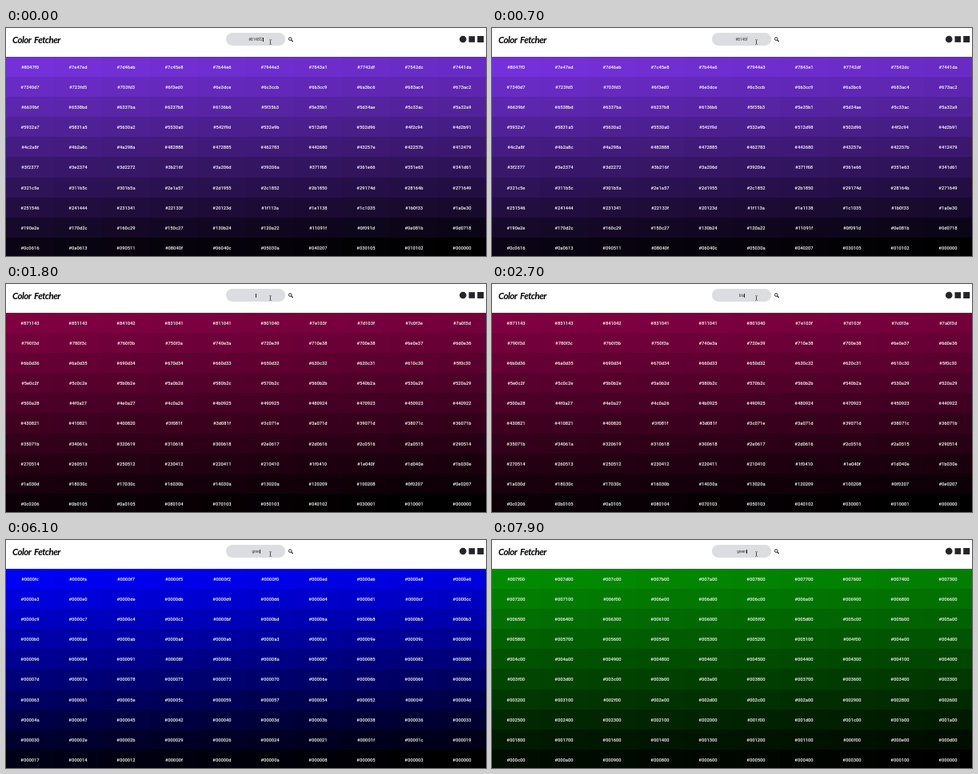
Animation of 600x285 px, one loop 8 s. Source, as an HTML page:

```html
<!DOCTYPE html>
<html lang="en">
<head>
<meta charset="utf-8">
<title>Color Fetcher</title>
<style>
  html, body { margin: 0; width: 100%; height: 100%; overflow: hidden; background: #fff; }
  #stage { position: relative; width: 600px; height: 285px; overflow: hidden; font-family: Roboto, sans-serif; }
  h1 {
    position: absolute; left: 8px; top: 6px; margin: 0; white-space: nowrap; color: #000;
    font: italic 700 11.5px/18px Lato, sans-serif; letter-spacing: -.5px; word-spacing: 2px;
  }
  #field {
    position: absolute; left: 275px; top: 6px; width: 74px; height: 16px; border-radius: 8px;
    background: #dcdde1; color: #333; font-size: 4.7px; line-height: 17px; text-align: center;
  }
  #caret { display: inline-block; width: .6px; height: 5.5px; margin-right: -.6px; background: #222; vertical-align: -1px; }
  svg { position: absolute; left: 0; top: 0; }
  #grid {
    position: absolute; left: 0; top: 36px; width: 600px; height: 251px;
    display: grid; grid-template: repeat(10, 25.1px) / repeat(10, 60px);
  }
  #grid div { color: #fff; font-size: 5.8px; font-weight: 500; line-height: 26.1px; text-align: center; }
</style>
</head>
<body>
<div id="stage">
  <h1>Color Fetcher</h1>
  <div id="field"><span id="query"></span><span id="caret"></span></div>
  <svg width="600" height="36" fill="none" stroke="#222">
    <circle cx="355.2" cy="13.6" r="1.8" stroke-width="1"/>
    <path d="M356.6 15l2 2" stroke-width="1.2"/>
    <path d="M329 14.5q1.5 0 1.5 1v4q0 1-1.5 1M332 14.5q-1.5 0-1.5 1v4q0 1 1.5 1" stroke-width=".5"/>
    <g fill="#24262b" stroke="none">
      <circle cx="571.2" cy="14" r="4.3"/>
      <rect x="578.5" y="10.2" width="7.6" height="7.6"/>
      <rect x="589.2" y="10" width="8" height="8"/>
    </g>
  </svg>
  <div id="grid"></div>
</div>
<script>
  const LOOP = 8000;
  const $ = id => document.getElementById(id);

  // Each key press: time and the resulting field text.
  const keys = [
    [0, '#8148f2'], [700, '#8148f'], [800, '#8148'], [900, '#814'],
    [1500, '#81'], [1600, '#8'], [1700, '#'], [1800, ''],
    [2300, 'b'], [2500, 'bl'], [2700, 'blu'], [2800, 'blue'], [3200, 'blue'],
    [4800, 'blu'], [4900, 'bl'], [5000, 'b'], [5100, ''],
    [5500, 'g'], [5700, 'gr'], [5900, 'gre'], [6100, 'gree'], [6300, 'green'], [6800, 'green']
  ];
  // Time, the colour named in the labels, and its tone on screen.
  const palettes = [
    [0, [129, 72, 242], [117, 48, 220]],
    [900, [136, 17, 68], [128, 0, 66]],
    [3200, [0, 0, 255], [0, 0, 245]],
    [6800, [0, 128, 0], [2, 140, 2]]
  ];

  const cells = Array.from({ length: 100 }, () => $('grid').appendChild(document.createElement('div')));
  const latest = (list, t) => list.filter(([at]) => at <= t).pop();
  const hex = n => Math.round(n).toString(16).padStart(2, '0');
  const shade = (rgb, keep) => '#' + rgb.map(c => hex(c * keep)).join('');
  let shown;

  function paint(palette) {
    if (palette === shown) return;
    shown = palette;
    const [, named, tone] = palette;
    cells.forEach((cell, i) => {
      const keep = 1 - (i + 1) / 100;
      cell.textContent = shade(named, keep);
      cell.style.background = shade(tone, keep);
    });
  }

  function draw() {
    const t = performance.now() % LOOP;
    const [pressed, text] = latest(keys, t);
    const blink = t < 1500 ? t : t - pressed;
    $('query').textContent = text;
    $('caret').style.visibility = blink % 1000 < 500 ? 'visible' : 'hidden';
    paint(latest(palettes, t));
    requestAnimationFrame(draw);
  }
  draw();
</script>
</body>
</html>
```
